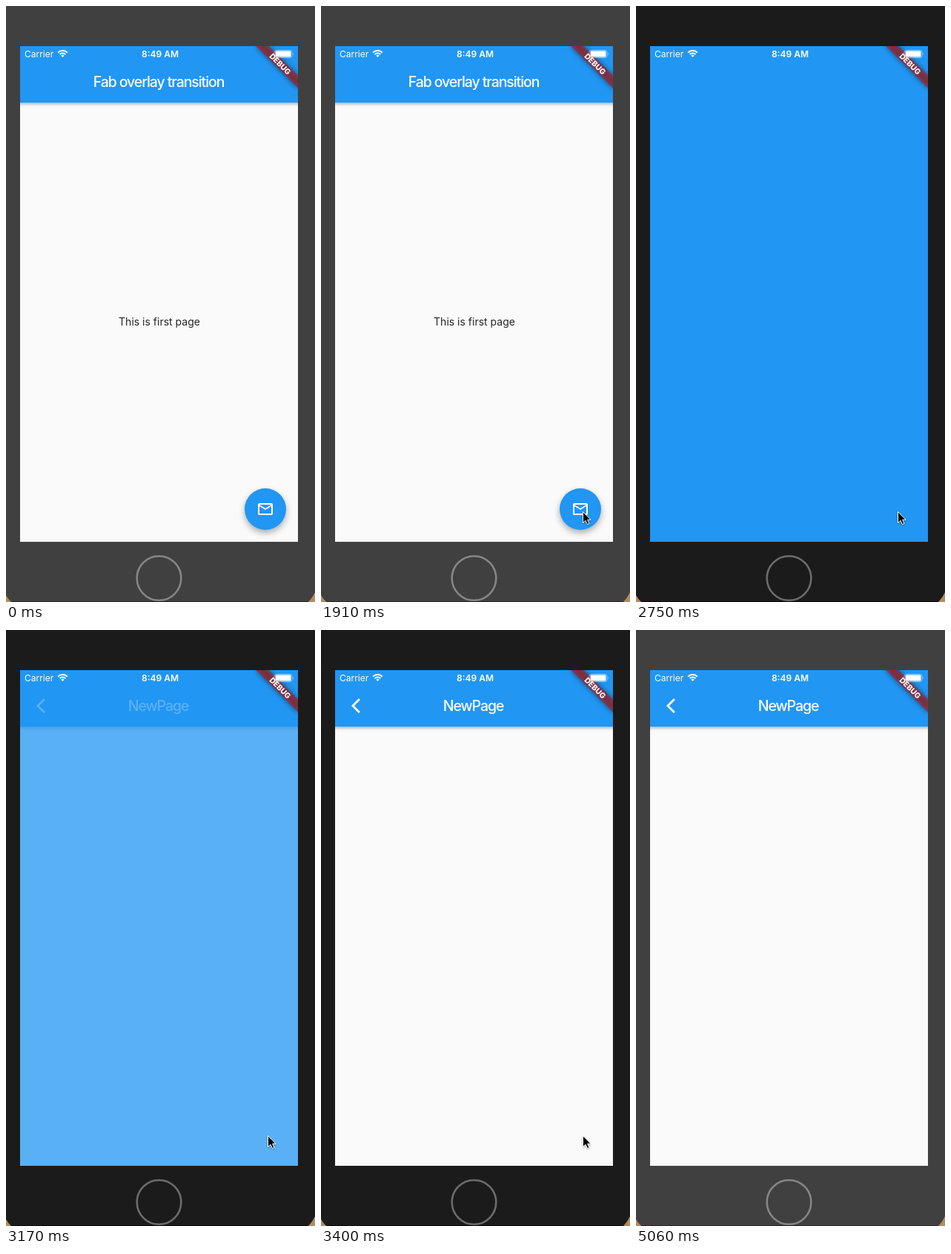
Write an HTML page that moves like this. It is 417 by 802 pixels and loops after 5.12 s.

```html
<!DOCTYPE html>
<html lang="en">
<head>
<meta charset="utf-8">
<title>Fab overlay transition</title>
<style>
  html, body { margin: 0; width: 100%; height: 100%; overflow: hidden; background: #404040; }
  svg { display: block; width: 417px; height: 802px; }
  text { font-family: Inter, Roboto, sans-serif; fill: #fff; }
  .mid { text-anchor: middle; }
  .small { font-size: 12px; }
  .title { font-size: 19.5px; font-weight: 500; letter-spacing: -1.08px; }
  .blue { fill: #2196f3; }
  .bar { filter: drop-shadow(0 2px 2px rgba(0, 0, 0, .3)); }
  .fab { filter: drop-shadow(0 4px 4px rgba(0, 0, 0, .32)); }
  #cursor { filter: drop-shadow(0 1px 1px rgba(0, 0, 0, .35)); }
</style>
</head>
<body>
<svg viewBox="0 0 417 802">
  <defs>
    <clipPath id="screen"><rect x="19" y="54" width="375" height="667"/></clipPath>
    <clipPath id="button"><circle cx="350" cy="677" r="28"/></clipPath>
    <filter id="soft" x="-50%" y="-200%" width="200%" height="500%"><feGaussianBlur stdDeviation="3.6"/></filter>
  </defs>

  <rect id="bezel" width="417" height="802"/>
  <path d="M0 793Q3 798 7 802H0zM417 789Q413 797 408 802H417z" fill="#b08d62"/>
  <rect id="edge" x="8" y="801" width="400" height="1"/>
  <circle id="home" cx="206.5" cy="770" r="29.8" fill="none" stroke-width="2.6"/>

  <g clip-path="url(#screen)">
    <rect x="19" y="54" width="375" height="667" fill="#fafafa"/>
    <text class="mid" x="207" y="430" style="font-size:14px;fill:#252525">This is first page</text>
    <rect class="blue bar" x="9" y="44" width="395" height="86"/>
    <text class="mid title" x="206" y="109">Fab overlay transition</text>
    <circle class="blue fab" cx="350" cy="677" r="28"/>
    <path transform="translate(338 665)" fill="#fff" fill-rule="evenodd"
      d="M20 4H4c-1.1 0-2 .9-2 2v12c0 1.1.9 2 2 2h16c1.1 0 2-.9 2-2V6c0-1.1-.9-2-2-2zm0 14H4V8l8 5 8-5v10zm-8-7L4 6h16l-8 5z"/>
    <circle id="splash" cx="353" cy="681" fill="#c8c8c8" fill-opacity=".3" clip-path="url(#button)"/>
    <circle id="overlay" class="blue" cx="350" cy="677"/>

    <g id="newPage">
      <rect x="19" y="54" width="375" height="667" fill="#fafafa"/>
      <rect class="blue bar" x="9" y="44" width="395" height="86"/>
      <path transform="translate(41 90)" fill="#fff" d="M11.9 3.9 9.9 2 0 12l9.9 10 2-1.9L3.9 12z"/>
      <text class="mid title" x="205.5" y="109">NewPage</text>
    </g>

    <g transform="translate(394 54) rotate(45)">
      <rect x="-40" y="28" width="80" height="12" opacity=".5" filter="url(#soft)"/>
      <rect x="-40" y="28" width="80" height="12" fill="#b71c1c" fill-opacity=".63"/>
      <text class="mid" y="37.7" style="font-size:10.2px;font-weight:800">DEBUG</text>
    </g>

    <text class="small" x="25" y="68.5">Carrier</text>
    <g transform="translate(76.5 69)" fill="none" stroke="#fff" stroke-width="2">
      <path d="M-6.3-6.3A8.9 8.9 0 0 1 6.3-6.3M-3.9-3.9A5.5 5.5 0 0 1 3.9-3.9"/>
      <path d="M0 0-2.2-2.2A3.1 3.1 0 0 1 2.2-2.2z" fill="#fff" stroke="none"/>
    </g>
    <text class="mid small" x="208" y="68.5" font-weight="600">8:49 AM</text>
    <rect x="362" y="59.5" width="24" height="10" rx="2.5" fill="none" stroke="#fff" stroke-opacity=".45"/>
    <rect x="363.5" y="60.5" width="21" height="8" rx="1.3" fill="#fff"/>
    <path d="M387.3 62.6q1.6 1.9 0 3.8z" fill="#fff" fill-opacity=".5"/>
  </g>

  <path id="cursor" d="M.5.5V15.6L4 12.3 6.5 17.6 9 16.5 6.6 11.3H11z" stroke="#fff"/>
</svg>
<script>
const LOOP = 5120;
const el = id => document.getElementById(id);
const set = (id, attrs) => {
  for (const name in attrs) el(id).setAttribute(name, attrs[name]);
};
const mix = (a, b, k) => a + (b - a) * k;

// Each run: first change, last change, number of changes.
const enter = [1260, 1730, 9], settle = [1790, 1910, 3], press = [2270, 2750, 9],
      fade = [3170, 3400, 5], leave = [3820, 4170, 7];

// Changes made so far in a run, from 0 to its count.
function count([from, to, n], t) {
  let done = 0;
  while (done < n && t >= Math.floor((from + (to - from) * done / (n - 1)) / 10) * 10) done++;
  return done;
}

// y of cubic-bezier(.42, 0, 1, 1) at x.
function easeIn(x) {
  let lo = 0, hi = 1;
  for (let i = 0; i < 24; i++) {
    const s = (lo + hi) / 2;
    if (1.26 * s * (1 - s) ** 2 + 3 * s * s * (1 - s) + s ** 3 < x) lo = s; else hi = s;
  }
  return 3 * lo * lo * (1 - lo) + lo ** 3;
}

function cursorAt(t) {
  const out = count(leave, t);
  if (t < enter[0] || out === leave[2]) return null;
  if (out) {
    const k = (out / 6) ** 2;
    return [mix(353, 359, k), mix(680, 756, k)];
  }
  const near = count(settle, t) / 3;
  if (near) return [mix(355, 353, near), mix(692.5, 680, near)];
  const k = 1 - (1 - (count(enter, t) - 1) / 8) ** 2;
  return [mix(383, 355, k), mix(791, 692.5, k)];
}

function draw(t) {
  const focused = t >= press[0] && t < 5060;
  set('bezel', { fill: focused ? '#1b1b1b' : '#404040' });
  set('edge', { fill: focused ? '#10080b' : '#2f2429' });
  set('home', { stroke: focused ? '#6c6c6c' : '#868686' });

  const pressed = count(press, t);
  set('splash', { r: pressed < 4 ? pressed * 9 : 0 });
  set('overlay', { r: pressed < 4 ? 0 : mix(28, 708, easeIn((pressed - 4) / 5)) });
  set('newPage', { opacity: Math.min(1, [0, .26, .46, .66, .86, 1][count(fade, t)]) });

  const at = cursorAt(t);
  set('cursor', at
    ? { visibility: 'visible', transform: `translate(${at[0]} ${at[1]})` }
    : { visibility: 'hidden' });
}

const start = performance.now();
function tick() {
  draw((performance.now() - start) % LOOP);
  requestAnimationFrame(tick);
}
tick();
</script>
</body>
</html>
```
